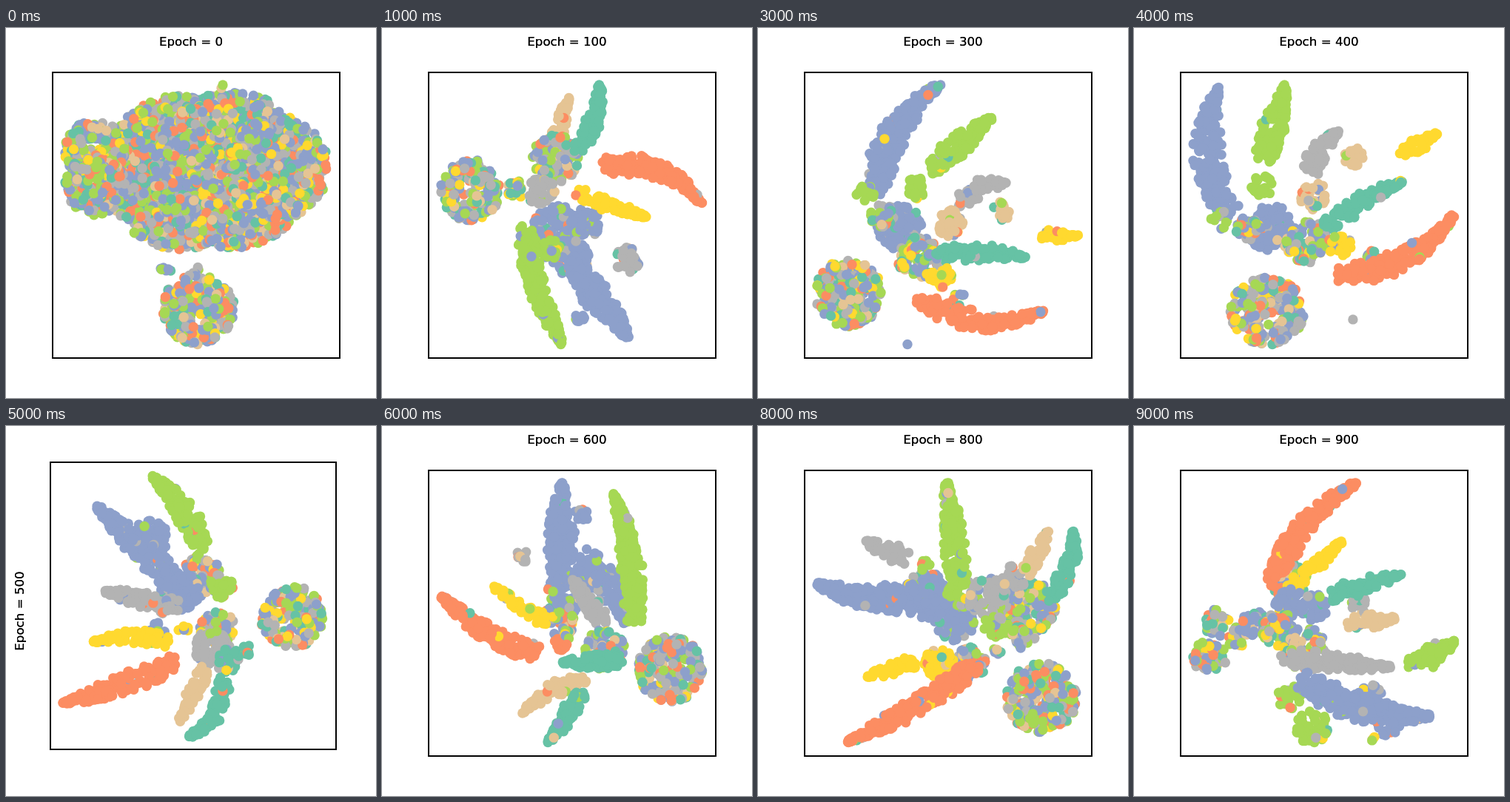
An HTML page with a canvas for the animation above (10 s loop, 500 by 500 pixels).

```html
<!DOCTYPE html>
<html lang="en">
<head>
<meta charset="utf-8">
<title>Embedding by epoch</title>
<style>
  html, body { margin: 0; width: 100%; height: 100%; overflow: hidden; background: #fff; }
  canvas { display: block; }
</style>
</head>
<body>
<canvas width="500" height="500"></canvas>
<script>
const CLASSES = {
  t: { color: '#66c2a5', width: 12 },
  o: { color: '#fc8d62', width: 15 },
  b: { color: '#8da0cb', width: 20 },
  g: { color: '#a6d854', width: 16 },
  y: { color: '#ffd92f', width: 10 },
  n: { color: '#e5c494', width: 11 },
  k: { color: '#b3b3b3', width: 13 },
};
const MIX = 'bbbbgggookkkttny'; // class frequencies
const DOT = 6.7;
const DENSITY = 0.037; // dots per square pixel
const BOUNDS = { x: [80, 432.5], y: [77, 427.5] };

// Key points of the clusters; M stands for all classes.
// Arm: class, tip x y, root x y, bend.  Blob: class, centre x y, radius.
const brain = `M 235 195 104, M 300 192 105, M 360 190 68, M 120 165 40, M 120 213 40,
  M 213 328 7, M 252 328 6, g 287 80 4, M 256 380 48`;

const star = `M 119 220 41, M 183 220 14, n 252 97 222 185 0, M 235 178 32, t 294 78 265 165 -8,
  b 235 270 30, b 275 265 20, b 255 310 25, k 215 222 19, y 356 256 265 225 0,
  o 432 238 300 188 21, g 228 300 14, g 243 426 195 275 -8, b 268 393 8,
  b 332 417 262 325 0, k 332 314 17`;

const fan = `b 195 270 30, M 220 310 28, M 172 255 16, b 248 80 165 220 18, g 150 225 12,
  g 317 124 240 190 0, g 218 218 14, k 336 212 278 238 8, n 332 249 13, n 262 265 18,
  y 432 282 386 280 0, t 361 310 250 308 5, y 250 336 15, M 275 367 9,
  o 385 383 225 368 -20, k 206 427 0, M 127 358 45`;

const hand = `M 265 200 28, g 292 215 16, g 199 68 265 165 -9, b 195 150 25, b 235 220 28,
  b 125 108 245 225 0, k 135 222 232 243 0, b 205 275 12, y 118 290 220 290 -8, y 240 270 8,
  o 79 371 225 318 5, M 285 270 24, k 280 297 25, t 302 315 17, t 328 300 8,
  n 235 396 272 325 0, t 247 417 292 340 17, M 387 256 42`;

const crown = `b 270 120 11, b 250 225 28, b 242 79 240 200 0, b 328 265 270 180 10,
  k 258 210 298 265 0, g 313 94 340 262 -8, k 189 178 9, M 240 262 22, y 150 218 220 265 0,
  o 80 231 208 308 8, o 242 292 12, M 300 303 28, t 245 320 320 318 0,
  n 190 388 275 343 -8, t 225 427 268 365 0, M 389 329 44`;

const wings = `b 260 265 26, b 225 230 32, b 81 213 240 225 14, g 270 225 20, g 250 77 268 215 0,
  g 223 190 9, k 145 157 195 177 0, M 360 245 34, k 305 232 27, k 338 205 16,
  g 315 270 16, M 350 285 16, n 382 143 356 200 0, t 415 143 385 230 -10, M 280 320 22,
  y 240 320 20, y 148 338 210 318 0, o 121 426 285 325 6, M 314 303 8, M 374 367 47`;

const branches = `M 120 266 18, M 145 285 14, M 110 312 22, b 170 265 18, M 215 210 24,
  o 304 79 192 210 14, y 284 158 215 220 0, b 215 240 20, b 248 245 18, k 308 242 12,
  t 361 202 270 230 0, n 354 260 292 268 0, M 200 275 22, M 235 300 28, n 222 295 10,
  k 347 325 210 312 0, g 432 292 378 322 0, g 215 365 16, b 320 365 18, b 345 400 18,
  b 399 390 235 345 -14, g 245 405 22, g 322 418 6`;

// One scene per hundred epochs; turn is in degrees.
const SCENES = [
  { clusters: brain },
  { clusters: star },
  { clusters: fan, turn: 20 },
  { clusters: fan },
  { clusters: fan, turn: -35 },
  { clusters: hand, sideways: true },
  { clusters: crown },
  { clusters: wings, turn: 18 },
  { clusters: wings },
  { clusters: branches },
];

function makeRandom(seed) {
  return () => {
    seed = (seed + 0x6d2b79f5) | 0;
    let h = Math.imul(seed ^ (seed >>> 15), 1 | seed);
    h = (h + Math.imul(h ^ (h >>> 7), 61 | h)) ^ h;
    return ((h ^ (h >>> 14)) >>> 0) / 4294967296;
  };
}

const lerp = (a, b, t) => a + (b - a) * t;

function makeDot(x, y, spread, name, impurity, random) {
  const angle = random() * 2 * Math.PI;
  const radius = spread * random() ** 0.45;
  const mixed = name === 'M' || random() < impurity;
  const member = mixed ? MIX[Math.floor(random() * MIX.length)] : name;
  return {
    x: x + radius * Math.cos(angle),
    y: y + radius * Math.sin(angle),
    color: CLASSES[member].color,
  };
}

function blob(name, [x, y, radius], random) {
  const count = Math.max(1, Math.round(Math.PI * radius ** 2 * DENSITY));
  return Array.from({ length: count }, () => makeDot(x, y, radius, name, 0.2, random));
}

// A tapered, bowed stroke from a narrow tip to a broad root.
function arm(name, [x1, y1, x2, y2, bend], random) {
  const { width } = CLASSES[name];
  const dx = x2 - x1, dy = y2 - y1, length = Math.hypot(dx, dy);
  const count = Math.round(length * width * 2 * DENSITY);
  return Array.from({ length: count }, (_, i) => {
    const t = i * 0.618034 % 1;
    const bow = 4 * t * (1 - t) * bend / length;
    const spread = width * (0.15 + 0.85 * Math.sin(2.4 * t));
    return makeDot(x1 + dx * t - dy * bow, y1 + dy * t + dx * bow, spread, name, 0.04, random);
  });
}

// Autoscales the dots to the plot area, as a chart axis would.
function fit(dots, axis) {
  const values = dots.map(d => d[axis]);
  const min = Math.min(...values), max = Math.max(...values);
  for (const d of dots) d[axis] = lerp(...BOUNDS[axis], (d[axis] - min) / (max - min));
}

function buildDots({ clusters, turn = 0, sideways }, index) {
  const random = makeRandom(index + 7);
  const dots = clusters.split(',').flatMap(cluster => {
    const [name, ...words] = cluster.trim().split(' ');
    const shape = words.length === 3 ? blob : arm;
    return shape(name, words.map(Number), random);
  });
  const angle = (sideways ? 90 : turn) * Math.PI / 180;
  const cos = Math.cos(angle), sin = Math.sin(angle);
  for (const d of dots) [d.x, d.y] = [d.x * cos - d.y * sin, d.x * sin + d.y * cos];
  fit(dots, 'x');
  fit(dots, 'y');
  return dots;
}

const ctx = document.querySelector('canvas').getContext('2d');
const plots = SCENES.map(buildDots);

function draw(index) {
  ctx.setTransform(1, 0, 0, 1, 0, 0);
  ctx.fillStyle = '#fff';
  ctx.fillRect(0, 0, 500, 500);
  if (SCENES[index].sideways) ctx.setTransform(0, -1, 1, 0, 0, 500);

  for (const { x, y, color } of plots[index]) {
    ctx.fillStyle = color;
    ctx.beginPath();
    ctx.arc(x, y, DOT, 0, 2 * Math.PI);
    ctx.fill();
  }

  ctx.strokeStyle = ctx.fillStyle = '#000';
  ctx.lineWidth = 2;
  ctx.strokeRect(63, 60, 388, 386);
  ctx.font = '16.67px "DejaVu Sans", sans-serif';
  ctx.textAlign = 'center';
  // A second pass darkens the antialiased edges.
  for (let pass = 0; pass < 2; pass++) ctx.fillText(`Epoch = ${index * 100}`, 250, 24);
}

const start = performance.now();
let shown = -1;
function tick() {
  const index = Math.floor((performance.now() - start) / 1000) % SCENES.length;
  if (index !== shown) draw(shown = index);
  requestAnimationFrame(tick);
}
tick();
</script>
</body>
</html>
```
